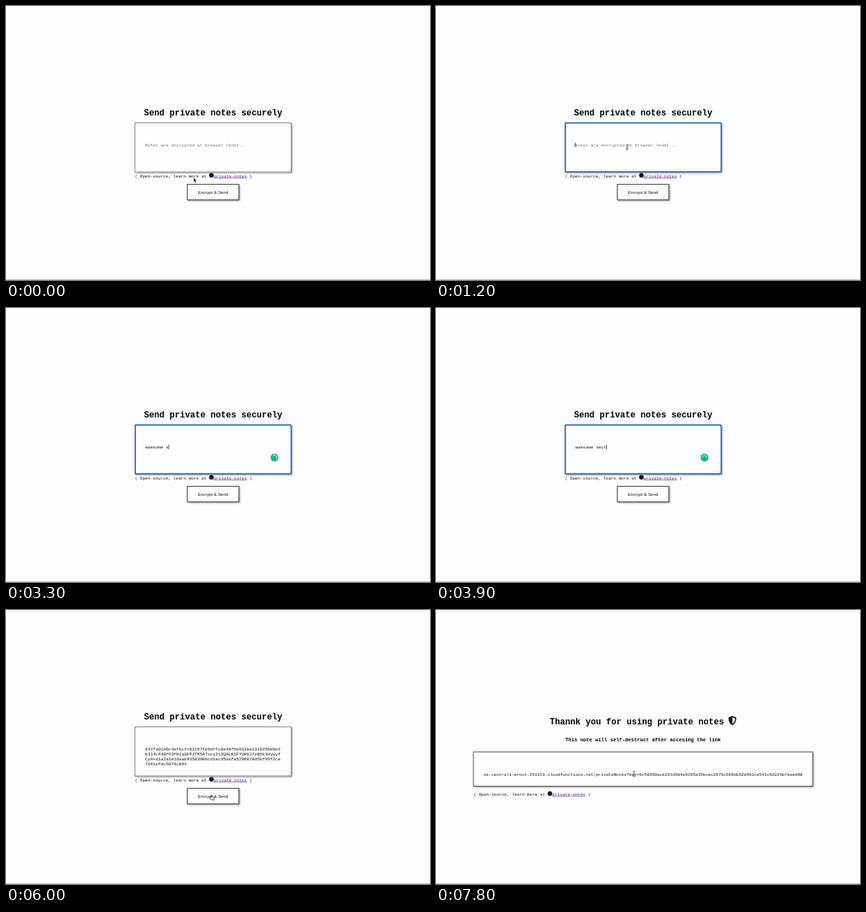
These frames come from a looping animation (600 px wide and 388 px high, 8000 ms). An HTML page:

```html
<!DOCTYPE html>
<html lang="en">
<head>
<meta charset="utf-8">
<title>Private notes</title>
<style>
  html, body { margin: 0; width: 100%; height: 100%; overflow: hidden; background: #fdfcff; }
  svg { display: block; width: 100%; height: 100%; }
  text { font-family: "Liberation Mono", monospace; font-size: 6.15px; fill: #111; white-space: pre; }
  .title { font-size: 12.08px; font-weight: bold; fill: #000; }
  .subtitle { font-size: 7.05px; font-weight: bold; fill: #000; }
  .small { font-size: 6.02px; }
  .link { fill: #551a8b; }
  .button { font-family: "Liberation Sans", sans-serif; }
  .placeholder { fill: #757575; }
  .box { fill: #fefdff; stroke-width: 1; }
</style>
</head>
<body>
<svg viewBox="0 0 600 388">
  <defs>
    <filter id="shadow" x="-10%" y="-20%" width="125%" height="150%">
      <feDropShadow dx="1.2" dy="1.2" stdDeviation="0.8" flood-color="#000" flood-opacity="0.4"/>
    </filter>
    <g id="credit">
      <text class="small" x="0" y="0">( Open-source, learn more at</text>
      <circle cx="108" cy="-2.8" r="3.2" fill="#111"/>
      <text class="small link" x="111.3" y="0">private-notes</text>
      <path d="M111.3 1h46.9" stroke="#551a8b" stroke-width="0.6"/>
      <text class="small" x="161.7" y="0">)</text>
    </g>
  </defs>
  <rect width="600" height="388" fill="#fdfcff"/>
  <path d="M0 387.5H600" stroke="#bdbdbf"/>

  <g id="compose">
    <text class="title" x="195.2" y="154.6">Send private notes securely</text>
    <rect class="box" x="182.5" y="165.5" width="221" height="69.5" stroke="#858585" filter="url(#shadow)"/>
    <path d="M399.5 233.8l3-3M401.3 233.8l1.2-1.2" stroke="#888" stroke-width="0.5"/>
    <rect id="ring" x="182.9" y="165.6" width="220.6" height="69.2" rx="1.6" fill="none" stroke="#1b63bd" stroke-width="1.6"/>
    <text id="placeholder" class="placeholder" x="196.8" y="199">Notes are encrypted at browser level...</text>
    <text id="note" x="196.8" y="199"></text>
    <g id="cipher"></g>
    <path id="caret" d="M0 193.4v6.6" stroke="#000" stroke-width="0.7"/>
    <g id="checker" transform="translate(380 211.8)">
      <circle r="5.6" fill="#15b58a"/>
      <path id="spinner" d="M-3 -1A3.2 3.2 0 0 1 3.2 0.3" fill="none" stroke="#e9fff8" stroke-width="0.9" stroke-linecap="round"/>
    </g>
    <use href="#credit" x="182.6" y="242.6"/>
    <rect class="box" x="256.5" y="252.5" width="73" height="22" stroke="#3c3c40" filter="url(#shadow)"/>
    <text class="button" x="293" y="265.6" text-anchor="middle">Encrypt &amp; Send</text>
  </g>

  <g id="thanks">
    <text class="title" x="161" y="161.8">Thannk you for using private notes</text>
    <path d="M419.4 150l5.4 2.1c0.2 5-1.4 9-5.4 11c-4-2-5.6-6-5.4-11z" fill="#0a0a0a"/>
    <path d="M419.4 151.7l3.9 1.5c0 3.8-1.2 6.6-3.9 8.2z" fill="#fdfcff"/>
    <text class="subtitle" x="183" y="185.9">This note will self-destruct after accesing the link</text>
    <rect class="box" x="53" y="201" width="480" height="48.5" stroke="#4a4a4e" filter="url(#shadow)"/>
    <text class="small" x="67.4" y="234.5">us-central1-eroot-253219.cloudfunctions.net/privateNotes?key=9c58350ace231d504e9295a35bcec2079c669bb52d492ce541c6d226b7eaed98</text>
    <use href="#credit" x="53.2" y="262.8"/>
  </g>

  <g id="pointer">
    <path id="arrow" d="M0 0v6.4l1.5-1.4l1.1 2.4l1.1-0.5l-1.1-2.3h2z" fill="#000" stroke="#fff" stroke-width="0.4"/>
    <path id="beam" d="M-1.5 -3.6q1.5 0 1.5 1q0-1 1.5-1M0 -2.6v5.4M-1.5 3.8q1.5 0 1.5-1q0 1 1.5 1M-0.8 1h1.6" fill="none" stroke="#222" stroke-width="0.7"/>
    <path id="hand" d="M-1.6 -2.6q0.6-0.8 1.2 0v2.2l3 0.6q0.9 0.3 0.8 1.2l-0.5 2.6h-3.7l-2.3-3q0-0.9 0.8-0.7l0.7 0.6z" fill="#fff" stroke="#111" stroke-width="0.7"/>
  </g>
</svg>
<script>
const LOOP = 8000, STEP = 100;
const FOCUS = 1000, ENCRYPTED = 5800, SENT = 6900;
const CHAR_WIDTH = 3.69;
const message = "awesome secret note";
const keyTimes = [1600, 1900, 2200, 2400, 2500, 2700, 2900, 3100, 3300, 3500,
                  3700, 3800, 4000, 4100, 4200, 4400, 4600, 4800, 5000];
const cipherLines = [
  "637fa01a9c4afbcfc82167fe9dffc0e48f5b033ba1316256b9e2",
  "b314c440f03fH1q3kPJTK5A7oci2l3QALK1F7UHbJ7zB5k1Hywyf",
  "Cp4=d1a2a1e1daab93583906cd1ec35abfa5296878d5bf99f2ce",
  "7d41efdc5074c891"
];
// time, x, y
const pointerPath = [
  [0, 265.5, 243], [800, 270.3, 200], [5000, 270.3, 200], [5200, 268.2, 223],
  [5700, 291.5, 265], [7100, 291.5, 265], [7800, 280, 232]
];

const el = id => document.getElementById(id);
const show = (id, visible) => el(id).setAttribute("display", visible ? "inline" : "none");

el("cipher").innerHTML = cipherLines
  .map((line, i) => `<text x="196.8" y="${199 + i * 6.95}">${line}</text>`).join("");

function pointerAt(t) {
  const next = pointerPath.findIndex(p => p[0] > t);
  if (next < 0) return pointerPath[pointerPath.length - 1].slice(1);
  const [t0, x0, y0] = pointerPath[next - 1], [t1, x1, y1] = pointerPath[next];
  const u = (t - t0) / (t1 - t0), k = u * u * (3 - 2 * u);
  return [x0 + (x1 - x0) * k, y0 + (y1 - y0) * k];
}

function pointerShape(t, y) {
  if (t >= SENT) return y < 250 && t > SENT ? "beam" : "arrow";
  if (y > 252) return "hand";
  return y < 235 ? "beam" : "arrow";
}

function render(t) {
  const typed = keyTimes.filter(k => k <= t).length;
  const focused = t >= FOCUS && t < ENCRYPTED;
  const encrypted = t >= ENCRYPTED;

  show("compose", t < SENT);
  show("thanks", t >= SENT);
  show("ring", focused);
  show("caret", focused);
  show("placeholder", typed === 0);
  show("note", !encrypted);
  show("cipher", encrypted);
  show("checker", t >= 1800 && !encrypted);
  show("spinner", t >= 2900);

  el("note").textContent = message.slice(0, typed);
  el("caret").setAttribute("transform", `translate(${197 + typed * CHAR_WIDTH} 0)`);
  el("spinner").setAttribute("transform", `rotate(${(t - 3900) / 650 * 360})`);

  const [x, y] = pointerAt(t), shape = pointerShape(t, y);
  for (const id of ["arrow", "beam", "hand"]) show(id, id === shape);
  show("pointer", t < keyTimes[0] || t > 5000);
  el("pointer").setAttribute("transform", `translate(${x} ${y})`);
}

const start = performance.now();
function tick() {
  const t = (performance.now() - start) % LOOP;
  render(Math.floor(t / STEP) * STEP);
  requestAnimationFrame(tick);
}
tick();
</script>
</body>
</html>
```
